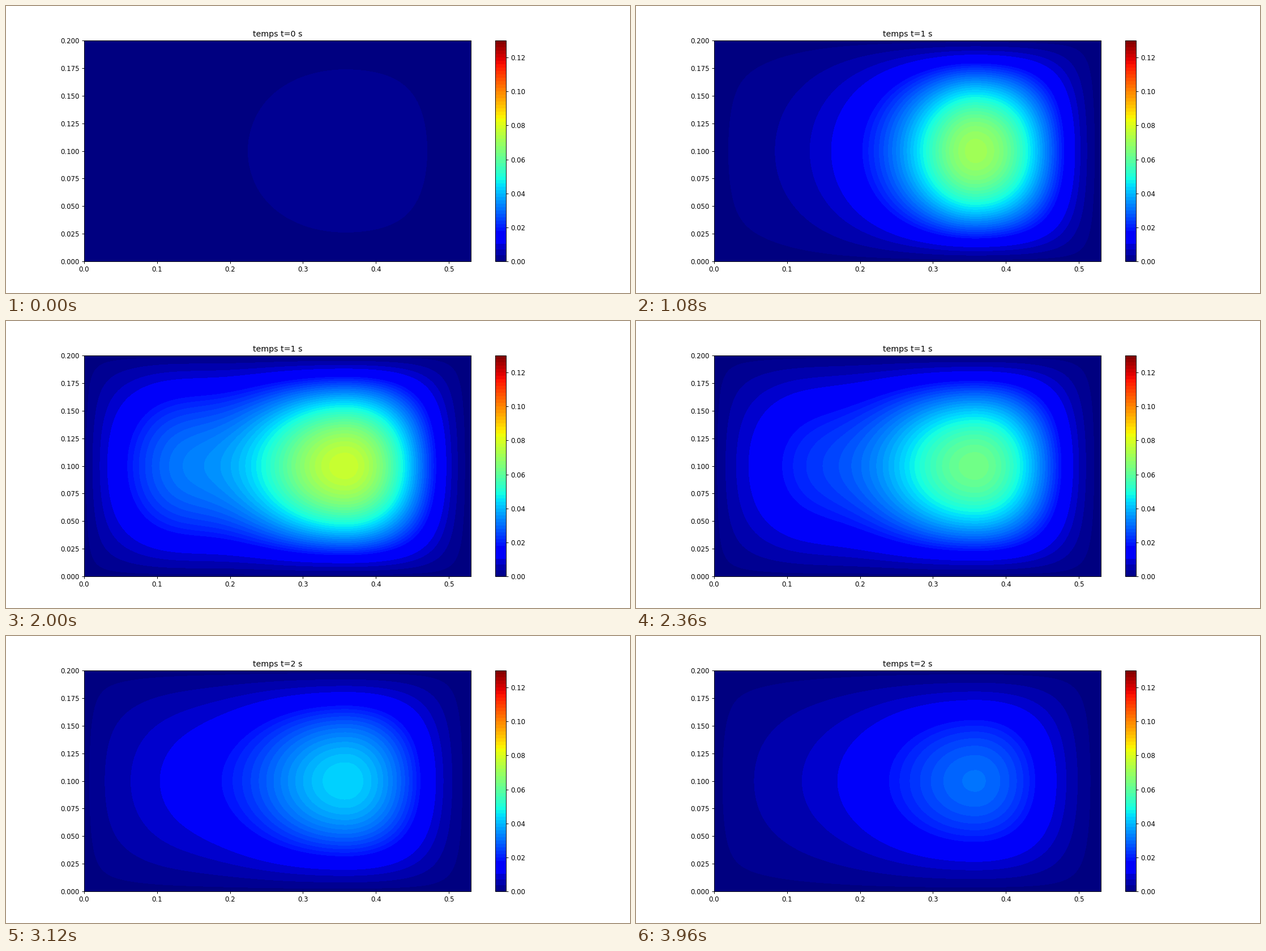
Animation, 1102 px wide and 508 px high, one loop 4000 ms. Source, as a matplotlib script:

```python
import numpy as np
import matplotlib.pyplot as plt
from matplotlib.animation import FuncAnimation
from matplotlib.cm import ScalarMappable
from matplotlib.colors import ListedColormap, Normalize

STAGE = np.array([1102, 508])
DPI = 84.75
FRAMES, INTERVAL = 100, 40
DT = 0.02

WIDTH, HEIGHT = 0.53, 0.2
VMAX = 0.13
SOURCE_X = 0.358   # heated spot
BLOB_X = 0.114     # short second burst, left of the spot
HEAT_END, BURST_END = 0.8, 1.0

# Wide bands in the dark blues, even steps above them.
LEVELS = np.concatenate([[0, 0.001, 0.0037, 0.007, 0.0103],
                         np.linspace(0.018, VMAX, 57)])
COLORS = plt.get_cmap("jet")((LEVELS[:-1] + LEVELS[1:]) / 2 / VMAX)

x = np.linspace(0, WIDTH, 200)
y = np.linspace(0, HEIGHT, 101)


def bell(center, sigma):
    return np.exp(-((x - center) / sigma) ** 2 / 2)


def smoothstep(t, start, end):
    s = np.clip((t - start) / (end - start), 0, 1)
    return s * s * (3 - 2 * s)


def peak(t):
    """Steady heating, then a decay that slows down."""
    heated = 0.0004 + 0.1312 * min(t, HEAT_END)
    return heated * np.exp(-1.09 * max(t - HEAT_END, 0) ** 0.79)


def profile(t):
    """Values along the middle line of the plate."""
    burst = smoothstep(t, HEAT_END, BURST_END)
    tail = 0.0752 + 0.03 * burst
    left = peak(t) / np.cosh((x - SOURCE_X) / tail)
    left += 0.0145 * burst * np.exp(-3.1 * max(t - BURST_END, 0)) * bell(BLOB_X, 0.058)
    left *= np.tanh(x / 0.027)
    reach = np.clip((x - SOURCE_X) / (WIDTH - SOURCE_X), 0, 1)
    right = peak(t) * np.clip(np.cos(np.pi / 2 * reach), 0, 1) ** 1.7
    # The burst fades into the right flank without a step at the spot.
    return np.where(x < SOURCE_X, left, right)


sharpness = 1 + 0.22 * bell(SOURCE_X, 0.106)
ACROSS = np.clip(np.sin(np.pi * y / HEIGHT), 0, 1)[:, None] ** sharpness

# The tiny margin keeps rounding from losing a pixel.
fig, ax = plt.subplots(figsize=(STAGE + 1e-6) / DPI, dpi=DPI)
steps = (np.arange(1300) + 0.5) / 1300 * VMAX
bands = ListedColormap(COLORS[np.searchsorted(LEVELS, steps) - 1])
fig.colorbar(ScalarMappable(Normalize(0, VMAX), bands), ax=ax,
             ticks=np.arange(0, VMAX, 0.02))
title = ax.set_title("")
ax.set_xticks(np.arange(0, WIDTH, 0.1))
ax.set_yticks(np.linspace(0, HEIGHT, 9))


def draw(n):
    t = max(n, 1) * DT
    for old in list(ax.collections):
        old.remove()
    ax.contourf(x, y, profile(t) * ACROSS, levels=LEVELS, colors=COLORS)
    ax.set_xlim(0, WIDTH)
    ax.set_ylim(0, HEIGHT)
    title.set_text(f"temps t={t:.0f} s")
    return [title]


anim = FuncAnimation(fig, draw, frames=FRAMES, interval=INTERVAL,
                     init_func=lambda: draw(0), repeat=True, repeat_delay=0)
plt.show()
```
